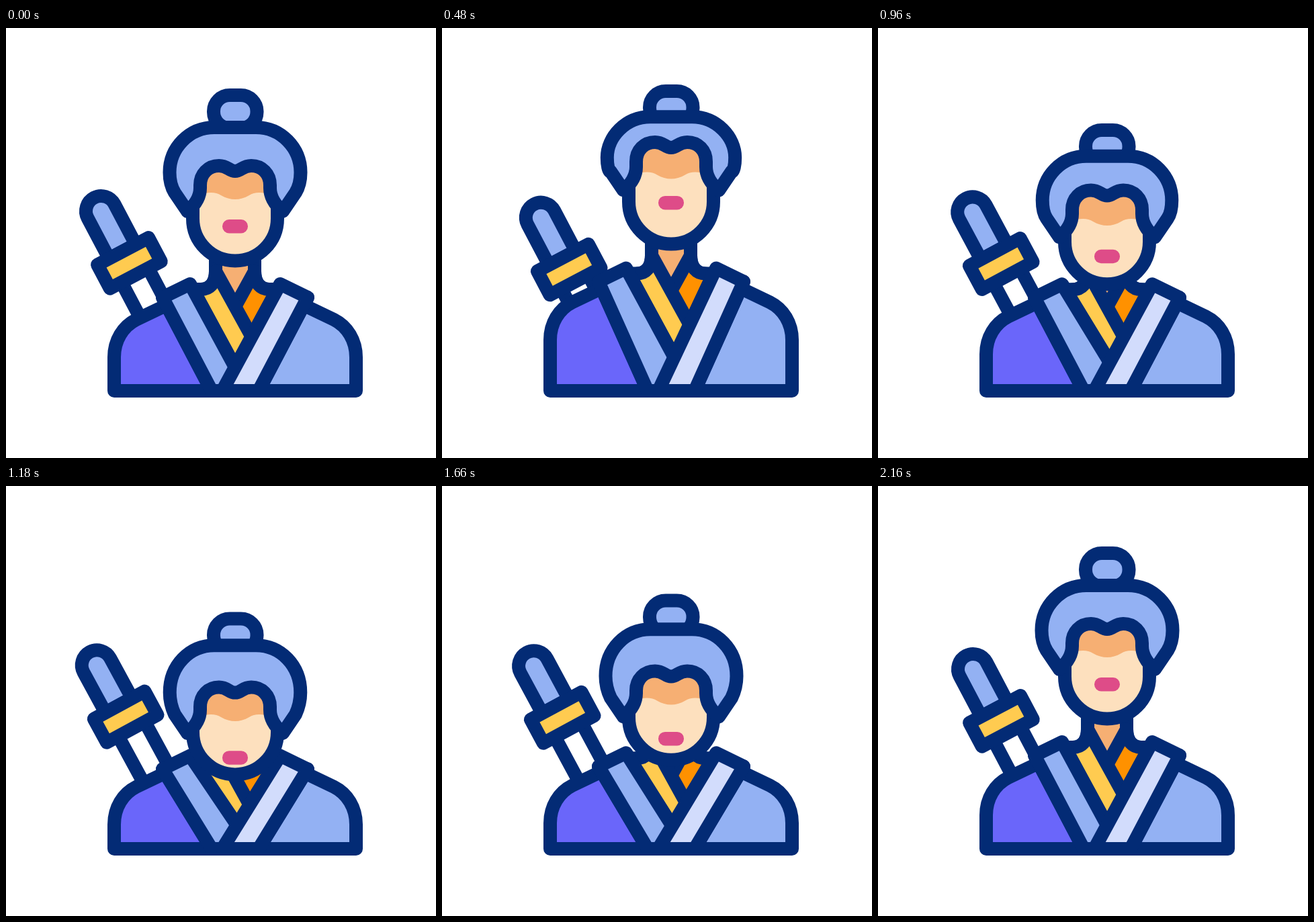
An HTML page with a canvas that plays this animation: 640x640 px, repeating every 2400 ms.

```html
<!DOCTYPE html>
<html lang="en">
<head>
<meta charset="utf-8">
<title>Swordsman</title>
<style>
html, body { margin: 0; width: 100%; height: 100%; overflow: hidden; background: #fff; }
canvas { display: block; width: 640px; height: 640px; }
</style>
</head>
<body>
<canvas id="stage" width="640" height="640"></canvas>
<script>
const ctx = document.getElementById('stage').getContext('2d');
const LOOP = 2400, UP = 585, DOWN = 1325, REST = 2160;
const INK = '#032b75', BLUE = '#93b1f3', PALE = '#d2dcfc', PURPLE = '#6a66fa',
  YELLOW = '#ffcb50', ORANGE = '#ff9100', SKIN = '#fde0be', SHADE = '#f6af73', LIP = '#de4c88';

// Sine ease from 0 to 1 between two times.
function ease(t, from, to) {
  const x = Math.min(1, Math.max(0, (t - from) / (to - from)));
  return (1 - Math.cos(Math.PI * x)) / 2;
}

function shape(d, fill, outlined = true) {
  const path = new Path2D(d);
  if (fill) { ctx.fillStyle = fill; ctx.fill(path); }
  if (outlined) ctx.stroke(path);
}

function mirrored(draw) {
  ctx.save();
  ctx.transform(-1, 0, 0, 1, 682, 0);
  draw();
  ctx.restore();
}

function sword(up, down) {
  ctx.save();
  ctx.translate(141.5 + 6.3 * up - 7.5 * down, 272.5 + 10.5 * up - 7.3 * down);
  ctx.rotate((-27.8 - 0.8 * down) * Math.PI / 180);
  shape('M-22.5 108V205M22.5 108V205');
  shape('M-22.5 68V0A22.5 22.5 0 0 1 22.5 0V68Z', BLUE);
  shape('M-42 68H44V108H-42Z', YELLOW);
  ctx.restore();
}

function body(up, down) {
  const y = n => n + 25 * down - 25.5 * up;         // collar and lapel tops
  const sleeve = n => n + 18 * down - 28 * up;      // shoulder curves
  const seam = 540 - 25.5 * up - 10 * down;         // lower end of the inner seam
  const neckSide = `C312 ${y(380)} 303 ${y(389)} 290 ${y(389)}`;

  const collar = (fill, end) => shape(`M312 ${y(362)}${neckSide}H278L360 ${end}L388 ${y(500)}Z`, fill);
  const side = fill => shape(`M242 ${sleeve(411)}L194 ${sleeve(434)}
    C174 ${sleeve(444)} 161 ${sleeve(465)} 161 ${sleeve(490)}V540H306L233 ${y(401)}Z`, fill);
  const lapel = (fill, end) => shape(`M233 ${y(401)}L274 ${y(381)}L360 ${end}V540H306Z`, fill);

  shape(`M312 ${y(330)}V${y(362)}${neckSide}L341 ${y(450)}L392 ${y(389)}
    C379 ${y(389)} 370 ${y(380)} 370 ${y(362)}V${y(330)}Z`, SHADE);
  mirrored(() => collar(ORANGE, 540));
  collar(YELLOW, seam);
  side(PURPLE);
  lapel(BLUE, seam);
  mirrored(() => { side(BLUE); lapel(PALE, 540); });
}

function head(up, down) {
  // Each feature shifts by its own amount, so the head seems to tilt.
  const shift = (a, b) => n => n + a * up + b * down;
  const bun = shift(-6.5, 108), top = shift(-17, 100), temple = shift(-24, 104),
    fringe = shift(-38, 108), ear = shift(-34, 108), brow = shift(-33, 108),
    mouth = shift(-38, 124), chin = shift(-27, 94);
  const l = 243.5 + 2.5 * up, r = 682 - l;

  const jaw = `V${chin(283.5)}A63 63 0 0 0 404 ${chin(283.5)}V`;
  shape(`M278 ${fringe(205)}${jaw}${fringe(205)}Z`, SKIN, false);
  shape(`M278 ${ear(262)}${jaw}${ear(262)}`);
  shape(`M285 ${brow(250)}C300 ${brow(243)} 312 ${brow(244)} 320 ${brow(249)}
    C334 ${brow(257)} 348 ${brow(257)} 362 ${brow(249)}
    C370 ${brow(244)} 382 ${brow(243)} 397 ${brow(250)}V${fringe(205)}H285Z`, SHADE, false);

  ctx.fillStyle = LIP;
  ctx.beginPath();
  ctx.roundRect(322, mouth(285), 38, 20.5, 10);
  ctx.fill();

  ctx.fillStyle = BLUE;
  ctx.beginPath();
  ctx.roundRect(309, bun(100), 64.5, 49, 24);
  ctx.fill();
  ctx.stroke();

  shape(`M270 ${ear(273)}L251 ${ear(245)}
    C${l + 2} ${temple(236)} ${l} ${temple(226)} ${l} ${temple(215)}
    C${l} ${top(178)} 273 ${top(148)} 310 ${top(148)}H372
    C409 ${top(148)} ${r} ${top(178)} ${r} ${temple(215)}
    C${r} ${temple(226)} ${r - 2} ${temple(236)} 431 ${ear(245)}L412 ${ear(273)}
    C399 ${ear(262)} 393 ${ear(250)} 393 ${ear(238)}V${fringe(234)}
    C393 ${fringe(217)} 381 ${fringe(205)} 365 ${fringe(205)}
    C352 ${fringe(205)} 350 ${fringe(213)} 341 ${fringe(213)}
    C332 ${fringe(213)} 330 ${fringe(205)} 317 ${fringe(205)}
    C301 ${fringe(205)} 289 ${fringe(217)} 289 ${fringe(234)}V${ear(238)}
    C289 ${ear(250)} 283 ${ear(262)} 270 ${ear(273)}Z`, BLUE);
}

function frame(now) {
  const t = Math.floor(now % LOOP / 20) * 20;
  const turn = ease(t, UP, DOWN);
  const up = ease(t, 0, UP) - turn, down = turn - ease(t, DOWN, REST);
  ctx.clearRect(0, 0, 640, 640);
  ctx.strokeStyle = INK;
  ctx.lineWidth = 20;
  ctx.lineJoin = ctx.lineCap = 'round';
  sword(up, down);
  body(up, down);
  head(up, down);
}

const start = performance.now();
function tick() {
  frame(performance.now() - start);
  requestAnimationFrame(tick);
}
tick();
</script>
</body>
</html>
```
